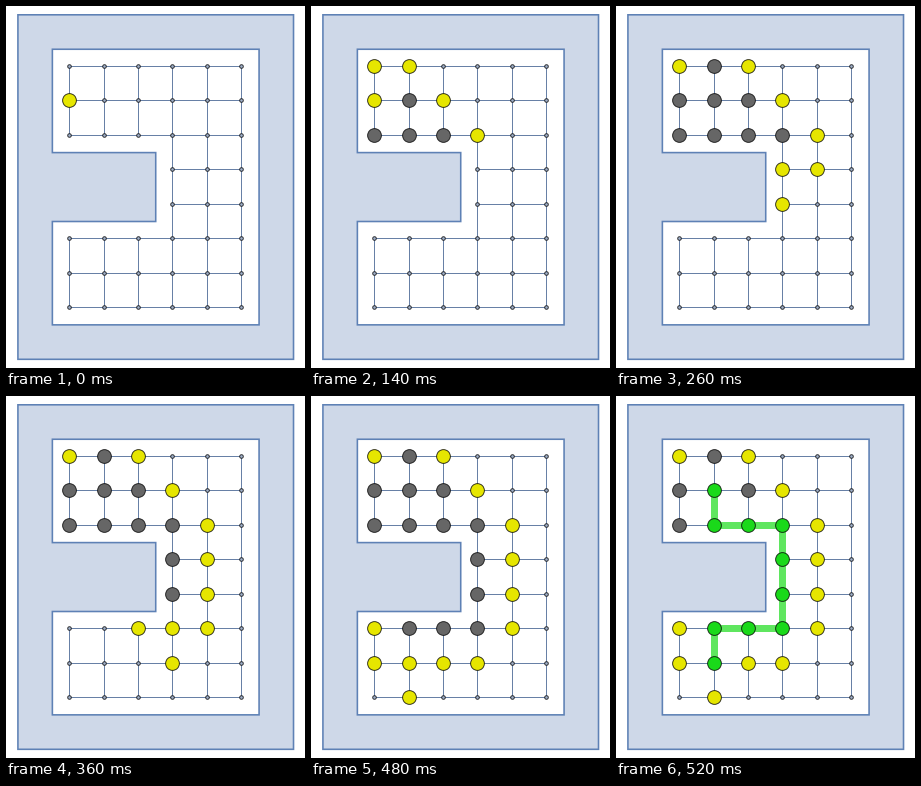
A matplotlib script that plays this animation: 299x362 px, repeating every 540 ms.

```python
import math

import matplotlib.pyplot as plt
from matplotlib.animation import FuncAnimation
from matplotlib.patches import Circle, PathPatch
from matplotlib.path import Path

W, H, DPI = 299, 362, 64
START, GOAL = (1, 1), (1, 6)

BLUE = (94 / 255, 129 / 255, 181 / 255)
EDGE = (103 / 255, 128 / 255, 166 / 255)
DOT = (163 / 255, 179 / 255, 204 / 255)
YELLOW = (0.9, 0.9, 0)
GRAY = (0.4, 0.4, 0.4)
GREEN = (0.1, 0.85, 0.1)
TRAIL = (95 / 255, 230 / 255, 95 / 255)
OUTLINE = (0, 0, 0, 0.75)

# Walls in grid units, y pointing down
OUTER = [(0, 0), (8, 0), (8, 10), (0, 10)]
ROOM = [(1, 1), (1, 4), (4, 4), (4, 6), (1, 6), (1, 9), (7, 9), (7, 1)]

NODES = [(c, r) for c in range(6) for r in range(8)
         if c > 2 or r not in (3, 4)]


def px(width):
    return width * 72 / DPI


def neighbours(node):
    c, r = node
    around = [(c - 1, r), (c, r - 1), (c, r + 1), (c + 1, r)]
    return [n for n in around if n in NODES]


def distance(node):
    return abs(node[0] - GOAL[0]) + abs(node[1] - GOAL[1])


def search():
    """Greedy best-first search; one snapshot per discovered node."""
    opened, closed, parent, steps = [], [], {START: None}, []
    current = START
    while True:
        for n in neighbours(current):
            if n not in parent:
                parent[n] = current
                opened.append(n)
                steps.append((set(opened), set(closed)))
        if current == GOAL:
            break
        if current in opened:
            opened.remove(current)
        closed.append(current)
        current = min(opened, key=lambda n: (distance(n), n))
    path = [GOAL]
    while parent[path[-1]]:
        path.append(parent[path[-1]])
    return steps, path


STEPS, ROUTE = search()
COUNT = len(STEPS) + 2

fig = plt.figure(figsize=(W / DPI, H / DPI), dpi=DPI, facecolor="white")
ax = fig.add_axes([0, 0, 1, 1])


def draw_scene(opened, closed, route, unit, left, top, big, small):
    def place(x, y):
        return left + unit * x, top + unit * y

    def center(node):
        # nodes and links sit on pixel centres
        x, y = place(node[0] + 1.5, node[1] + 1.5)
        return math.floor(x) + 0.5, math.floor(y) + 0.5

    def link(a, b, color, width):
        (x1, y1), (x2, y2) = center(a), center(b)
        ax.plot([x1, x2], [y1, y2], color=color, lw=px(width),
                solid_capstyle="butt", snap=False, zorder=0)

    for a in NODES:
        for b in neighbours(a):
            if a < b:
                link(a, b, EDGE, 1)
    for a, b in zip(route, route[1:]):
        link(a, b, TRAIL, 7)

    for node in NODES:
        if node in route:
            color = GREEN
        elif node in closed:
            color = GRAY
        elif node in opened:
            color = YELLOW
        else:
            color = DOT
        radius = small if color == DOT else big * unit
        ax.add_patch(Circle(center(node), radius, facecolor=color,
                            edgecolor=OUTLINE, lw=px(1), zorder=1))

    verts, codes = [], []
    for ring in (OUTER, ROOM):
        verts += [place(*p) for p in ring + ring[:1]]
        codes += [Path.MOVETO] + [Path.LINETO] * (len(ring) - 1)
        codes += [Path.CLOSEPOLY]
    ax.add_patch(PathPatch(Path(verts, codes), facecolor=BLUE + (0.3,),
                           edgecolor=BLUE, lw=px(1.6), zorder=2,
                           joinstyle="miter", snap=False))


def update(i):
    ax.cla()
    ax.set_xlim(0, W)
    ax.set_ylim(H, 0)
    ax.axis("off")
    opened, closed = STEPS[min(i, len(STEPS) - 1)]
    if i == COUNT - 2:
        # the markers swell and the view zooms out to hold them
        draw_scene(opened, closed, [], 20.25, 80.2, 79.7, 5, 1.1)
    else:
        route = ROUTE if i == COUNT - 1 else []
        draw_scene(opened, closed, route, 34.45, 11.92, 8.8, 0.2, 1.8)
    return []


anim = FuncAnimation(fig, update, frames=COUNT, init_func=lambda: [],
                     interval=20, repeat=True, repeat_delay=0)
plt.show()
```
